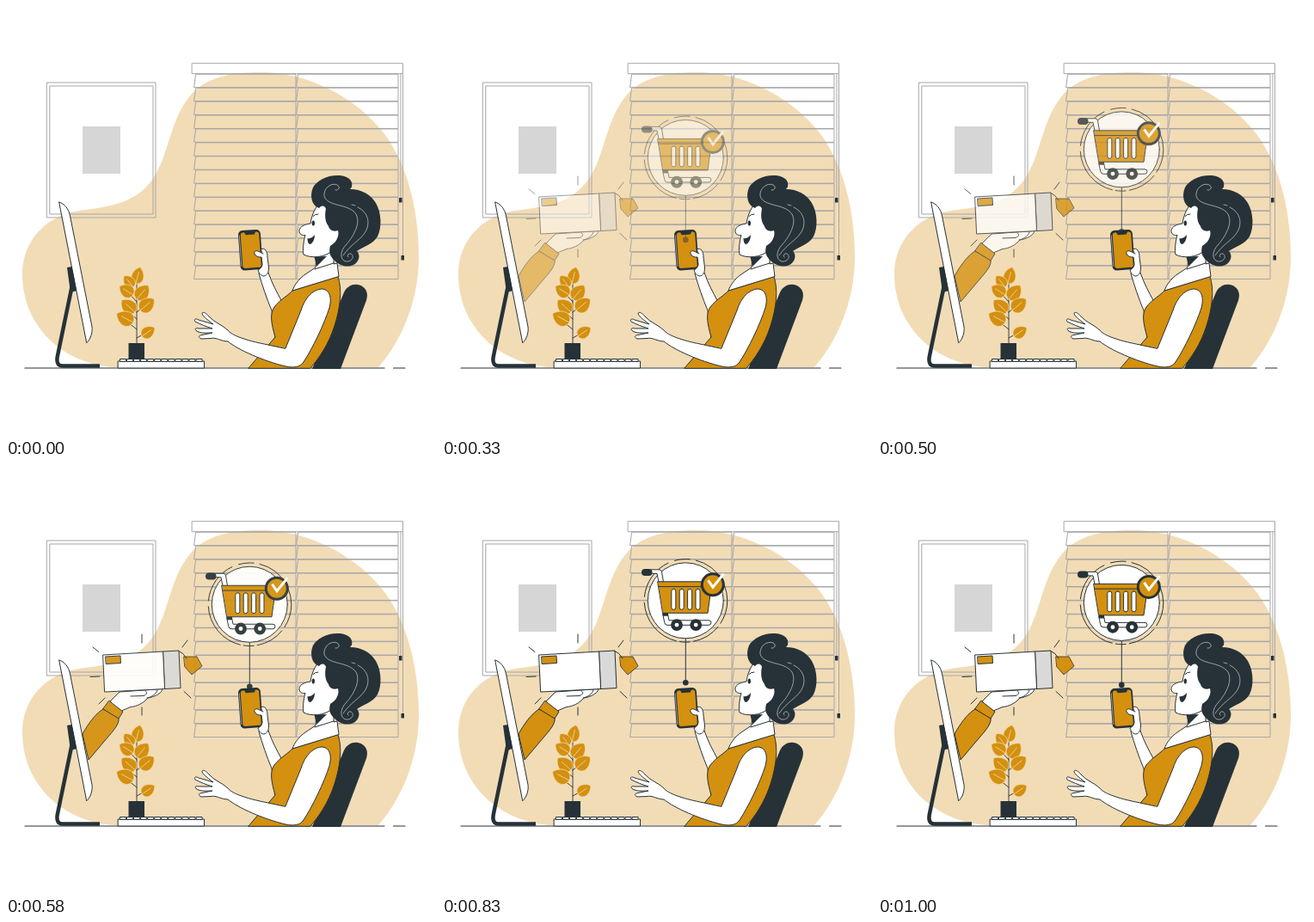
These frames come from a looping animation (500x500 px, 1040 ms). An HTML page:

```html
<!DOCTYPE html>
<html lang="en">
<head>
<meta charset="utf-8">
<title>Online shopping</title>
<style>
html, body { margin: 0; width: 100%; height: 100%; overflow: hidden; background: #fff; }
svg { display: block; width: 100%; height: 100%; }
.n { fill: none; }
.w { fill: #fff; }
.o { fill: #d4900f; }
.d { fill: #263238; }
.d, .flat { stroke: none; }
.grey { fill: none; stroke: #a6a6a6; }
.thick { fill: none; stroke-width: 4.5; }
</style>
</head>
<body>
<svg viewBox="0 0 500 500" stroke="#263238" stroke-linejoin="round" stroke-linecap="round">
  <path class="flat" fill="#f2dcb6" d="M125 420C68 416 19 374 19 312C19 270 50 243 85 238C125 233 155 228 174 196C190 168 192 128 217 101C237 80 270 77 296 77C350 77 407 105 441 150C470 190 480 245 480 292C480 345 458 392 433 420Z"/>

  <!-- picture and window -->
  <g class="grey">
    <path d="M47.700 89H174V246H47.700ZM51.200 93H171V242H51.200Z"/>
    <path id="slats"/>
    <path d="M459 79V224M461.500 79V290"/>
    <path d="M216.500 66.700H461.500V78.700H216.500Z"/>
  </g>
  <path class="flat" fill="#d6d6d6" d="M89 140H133V195H89Z"/>
  <path class="d" d="M457 223H460.500V228.500H457ZM459.500 290H463V295.500H459.500Z"/>
  <path class="n" stroke-width="1.200" d="M22 421H440M450.500 421H464"/>

  <!-- woman -->
  <path class="d" d="M356 422L393 333C397 324 408 321 415 326.500C421 331 421 338 418 345L389 422Z"/>
  <path class="w" d="M294 311C298 325 303 340 309 354L313 386L330 350L320.500 343C315 333 309 322 305 310Z"/>
  <path class="o" d="M282 421L313 385C309 371 306 358 312 350C319 341 329 336 333 331L386 314.500C391 330 389 350 382 372C375 394 363 411 354 421Z"/>
  <path class="w" d="M361 288L360 304L348 312C341 317 336 323 333 331L387 314.500L385 299L381 300V286Z"/>
  <path class="n" d="M359 306L381 299"/>
  <path class="d" d="M358.500 291.500L373 291L361 303Z"/>
  <path class="w" d="M364 230C358 236 355 246 354 253C349 253.500 341 256 341 261.500C341 265.500 344.500 267 348 266.500C345.500 275 345 284 346 289C354 293.500 371 293 380 284L391 258L373 230Z"/>
  <path class="d" d="M364 235C355 232 353 220 357 211C362 202 375 196 388 197C398 198 404 203 402 210.500L400 213C413 213 424 219 430 229C437 241 437 258 432 268C427 277 415 280 408 285C413 290 410 298 404 301C396 305 386 301 380 294C375 288 376 284 377 279C384 275 388 268 386 261C380 263 376 260 375 256C370 250 371 240 372 236C371 232 367 231 364 235ZM350.500 270C353 271 357 269 359 266C359 272 356 277 353 277C351 276 350.500 273 350.500 270Z"/>
  <ellipse class="d" cx="357.300" cy="252.500" rx="1.700" ry="3"/>
  <path class="n" d="M357 244.500Q359 242 363 242"/>
  <path class="n" stroke="#b9bec1" stroke-width=".8" d="M383 214C387 215 389 210 385 208C378 205 369 212 370 221C374 234 398 229 407 242C413 253 403 269 396 277C388 285 388 295 395 297C402 298 406 291 401 288C398 287 396 291 398 292M402 231L406 232M409 234C422 240 424 254 417 264C411 273 401 277 392 290"/>
  <path class="w" d="M325 398L343 354C348 338 358 329 368 329C377 330 379 340 376 351C370 370 356 399 346 414C342 420 335 421 325 419C300 413 270 400 258 390C250 390 245 385 238 386.500L227 387C223 385 224 383 228 382.500L240 380C233 380 226 381 221 377.500C219 375 221 374 224 375L240 375C233 373 226 370 220 367C218 364 221 363 224 365L241 370C236 366 230 362 228 358C228 355 232 356 236 361C242 368 252 371 258 377C262 383 280 389 300 393Z"/>

  <!-- phone -->
  <g transform="rotate(-4 284 283.500)">
    <rect class="d" x="271.200" y="260.500" width="26" height="46.500" rx="5"/>
    <rect class="o flat" x="274" y="263" width="21.500" height="41.500" rx="3"/>
    <path class="d" d="M278 262H292L290 266H280Z"/>
    <path class="n" stroke="#fff" stroke-width=".5" d="M272.500 266V302"/>
  </g>
  <path class="w" d="M297 282.500C301 281 304 285 304 292L305.500 304C305.500 310 304 313 300 314C296 314 294 310 293 307C296 305.500 298 303 298 300L297 292C294 292.500 290 291 289 288C288 285 291 284 294 285.500L299 288"/>

  <!-- appearing delivery and cart -->
  <g id="order">
    <path class="n" d="M158 198V208M101 213L108 218.500M98 247.500L109 247M108 279L115 272M158 283V292M211 205L205 213M207 264.500L215 272"/>
    <path class="w" d="M119 278L132 265L182 261.500C181 267 172 271 165 272C160 278 152 282 145 282.500L134 287Z"/>
    <path class="n" d="M145 270L160 269.500C164 268 165 265 162 264M164 272C170 271 175 267 176 263"/>
    <path class="o" d="M113 285L131 295C132 300 128 306 124 311L96 344L89 314C95 303 104 290 113 285Z"/>
    <path class="o" d="M120 275.500L136 288L131 296L113 285Z"/>
    <path class="w" d="M113 222L183 218L185 261.500L115 265Z"/>
    <path fill="#d9d9d9" d="M183 218L201 217L203 260.500L185 261.500Z"/>
    <path class="o" d="M116 224L133 223L133.500 231.500L116.500 232.500Z"/>
    <path class="o" stroke-width=".8" d="M207 224L222 224L228 235L216 245L208 236Z"/>
    <path class="n" d="M201 217.500Q206 219 210 226"/>
    <g id="cart">
      <path class="n" d="M283.300 204V256"/>
      <circle class="d" cx="283.300" cy="256" r="3.300"/>
      <circle class="n" cx="283.500" cy="160.500" r="48.300" stroke-dasharray="28 5 34 4 12 4 62 7 50 8 18 7 40 5"/>
      <circle class="w" cx="283.300" cy="160.500" r="44"/>
      <path class="w" d="M243 124.500H253Q255 125 255.500 127L257.500 139H252L250 129H243Z"/>
      <rect class="d" x="232" y="123.700" width="12.500" height="8" rx="4"/>
      <path class="w" d="M257 176H262.500L264 183.500H310Q313 183.500 313 186Q313 189 310 189H262Q259 189 258.700 186Z"/>
      <path class="d" d="M256.500 174.500H263V178.500H257Z"/>
      <path class="o" d="M251 138.500H314L309 175H257Z"/>
      <path class="n" d="M252 144.300H313"/>
      <g id="slots" class="w"></g>
      <g class="w" stroke-width="4.500">
        <circle cx="273" cy="188.800" r="4.700"/>
        <circle cx="295.200" cy="188.800" r="4.700"/>
      </g>
      <circle class="o" cx="314.800" cy="142" r="12.500" stroke-width="3"/>
      <path class="n" stroke="#fff" stroke-width="3" stroke-linecap="butt" stroke-linejoin="miter" d="M309.500 137L315 145L327.500 129.500"/>
    </g>
  </g>

  <!-- desk -->
  <path class="d" d="M71 304L77 303L82.500 331L75 333Z"/>
  <path class="thick" stroke-linecap="butt" d="M77.500 322L59.700 408Q58 418.500 66 418.500H109"/>
  <path class="w" d="M62 228C68 230 73 236 74.500 244L100 373C101 380 98 388 94 391.500Z"/>
  <path class="n" stroke-width=".9" d="M152 392V320M152 344L143 334M152 340L160 333M152 356L164 347M152 364L142 355M152 376L142 368M152 386L165 379"/>
  <g id="leaves" class="o" stroke="#f2dcb6" stroke-width=".7"></g>
  <path class="d" d="M142.500 392H161V411H142.500Z"/>
  <path class="w" d="M130.500 413H230.500V421H130.500Z"/>
  <path id="keys" class="w"/>
</svg>
<script>
const $ = id => document.getElementById(id);
const range = (n, f) => Array.from({ length: n }, (_, i) => f(i)).join('');

$('slats').setAttribute('d', range(15, i => {
  const y = 79.3 + i * 15.92;
  return [221, 340].map(x => `M${x} ${y}H${x + 116}V${y + 15.4}H${x - 2}Z`).join('');
}));
$('slots').innerHTML = range(4, i =>
  `<rect x="${266.8 + i * 9.4}" y="147" width="5" height="24" rx="2.5"/>`);
$('keys').setAttribute('d', range(12, i => `M${132.5 + i * 8.05} 413V410.500H${139.5 + i * 8.05}V413Z`));

// Each leaf: base point, length, width, angle from upright
const leaf = ([x, y, len, w, turn]) => `<path transform="translate(${x} ${y}) rotate(${turn})"
  d="M0 0C${-w} ${-len * .05} ${-w * .9} ${-len * .7} 0 ${-len}C${w * .9} ${-len * .7} ${w} ${-len * .05} 0 0V${-len * .7}"/>`;
$('leaves').innerHTML = [
  [151, 323, 20, 10, 14], [148, 327, 17, 9, -38], [148, 336, 19, 10.5, -58],
  [152, 341, 21, 11.5, 40], [156, 354, 21, 11.5, 50], [150, 356, 21, 11.5, -48],
  [148, 368, 22, 12, -62], [158, 384, 18, 9.5, 56]
].map(leaf).join('');

const LOOP = 1040, STEP = 125 / 3;
function draw(now) {
  const n = Math.min(24, Math.floor((now % LOOP + 4) / STEP));
  const t = n * STEP;
  const alpha = Math.min(1, Math.max(0, (n - 2) / 13));
  // The cart floats on a three second swing, highest at 820 ms
  const drop = 37 * (1 - Math.cos((t - 820) * Math.PI / 1500)) - 1.7;
  $('order').setAttribute('opacity', alpha);
  $('cart').setAttribute('transform', `translate(0 ${drop})`);
}
const start = performance.now();
function tick() {
  draw(performance.now() - start);
  requestAnimationFrame(tick);
}
tick();
</script>
</body>
</html>
```
